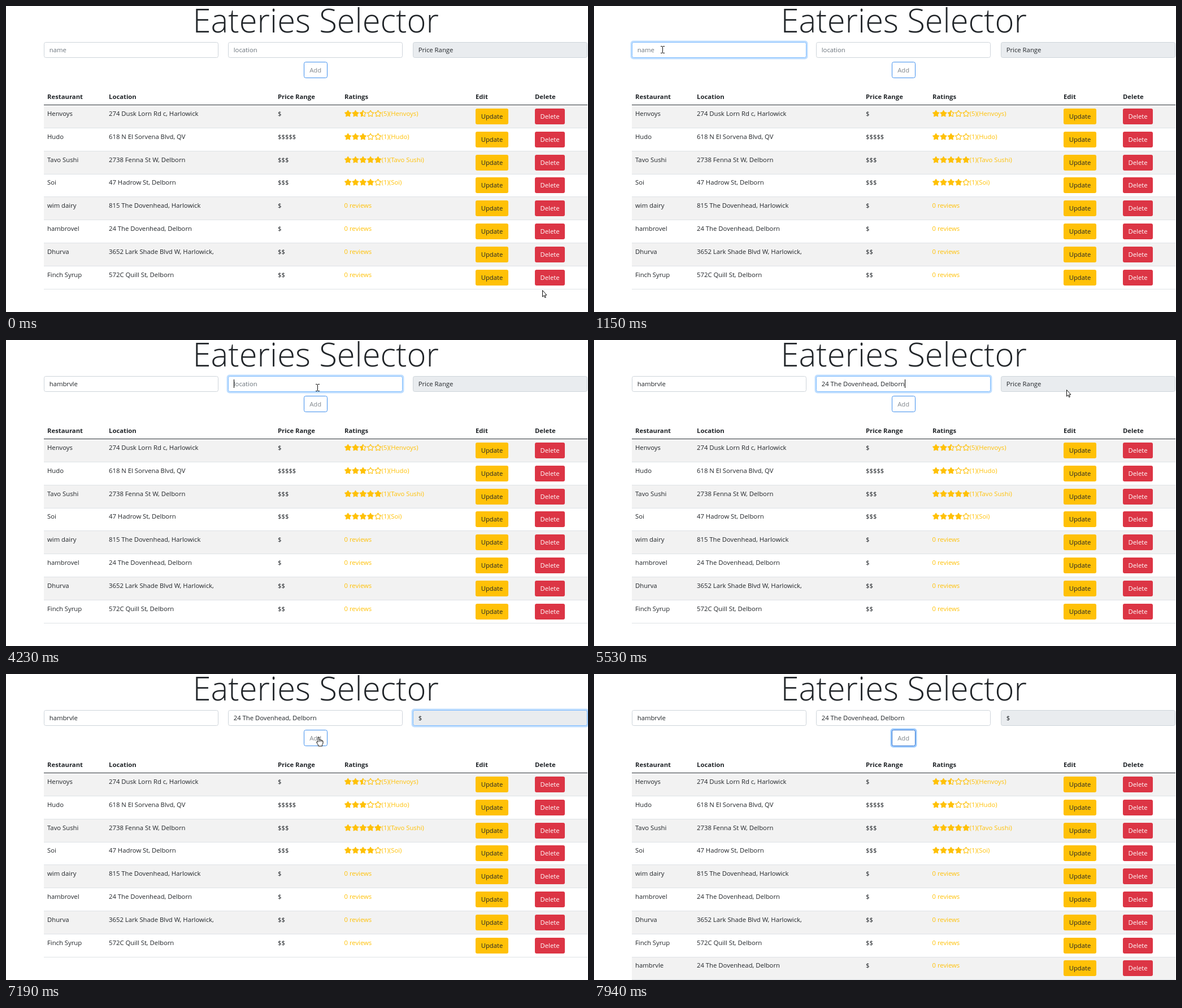
An HTML page with a canvas for the animation above (8000 ms loop, 1030 px wide and 543 px high).

```html
<!DOCTYPE html>
<html lang="en">
<head>
<meta charset="utf-8">
<title>Eateries Selector</title>
<style>
  html, body { margin: 0; width: 100%; height: 100%; overflow: hidden; background: #fff; }
  canvas { display: block; width: 1030px; height: 543px; }
</style>
</head>
<body>
<canvas id="stage"></canvas>
<script>
const W = 1030, H = 543, LOOP = 8000;
const canvas = document.getElementById('stage');
const ctx = canvas.getContext('2d');
const ratio = window.devicePixelRatio || 1;
canvas.width = W * ratio;
canvas.height = H * ratio;

const FAMILY = '"Open Sans", "Noto Sans", sans-serif';
const BODY = `400 11.3px ${FAMILY}`;
const BOLD = `700 11.3px ${FAMILY}`;
const TITLE = `300 58px ${FAMILY}`;
const INK = '#212529', GREY = '#6c757d', YELLOW = '#ffc107';

const TYPED_NAME = 'hambrvle';
const TYPED_PLACE = '24 The Dovenhead, Delborn';
const ROWS = [
  ['Henvoys', '274 Dusk Lorn Rd c, Harlowick', '$', 2.5, 5],
  ['Hudo', '618 N El Sorvena Blvd, QV', '$$$$$', 3, 1],
  ['Tavo Sushi', '2738 Fenna St W, Delborn', '$$$', 5, 1],
  ['Soi', '47 Hadrow St, Delborn', '$$$', 4, 1],
  ['wim dairy', '815 The Dovenhead, Harlowick', '$'],
  ['hambrovel', TYPED_PLACE, '$'],
  ['Dhurva', '3652 Lark Shade Blvd W, Harlowick,', '$$'],
  ['Finch Syrup', '572C Quill St, Delborn', '$$'],
  [TYPED_NAME, TYPED_PLACE, '$']
];
const COLUMNS = { Restaurant: 73, Location: 182, 'Price Range': 481, Ratings: 599, Edit: 831, Delete: 936 };
const TABLE_X = 67, TABLE_W = 962, ROW_TOP = 175.15, ROW_STEP = 40.8;

const NAME_BOX = [67, 64, 309, 28];
const PLACE_BOX = [393, 64, 309, 28];
const PRICE_BOX = [720, 64, 309, 28];
const ADD_BOX = [527, 99, 42, 29];

const NAME_FOCUS = 620, PLACE_FOCUS = 4100, PASTE = 5050;
const MENU_OPEN = 5740, MENU_PICK = 6560, ADD_FOCUS = 7260, ROW_ADDED = 7320;
const KEYS = [1680, 1810, 2010, 2120, 2220, 2330, 2430, 2540, 2740];
const BLINK = 530, TICK = 69, POINTER_GONE = 7935;

// Pointer path: time, x, y
const PATH = [
  [70, 949, 504], [340, 640, 300], [540, 190, 95], [620, 128, 72], [820, 121, 77],
  [3270, 121, 77], [3400, 99, 62], [3540, 180, 10], [3700, 330, 6], [3880, 500, 50], [4020, 551, 84],
  [4630, 551, 84], [4900, 640, 100], [5150, 740, 103], [5400, 836, 92], [5470, 836, 88],
  [5600, 836, 88], [MENU_OPEN, 834, 82], [5950, 810, 184], [6220, 783, 104], [6360, 781, 111],
  [MENU_PICK, 781, 111], [6900, 660, 130], [7190, 553, 112],
  [ROW_ADDED, 553, 112], [7600, 575, 280], [7870, 600, 521]
];

const inside = (p, [x, y, w, h]) => p.x >= x && p.x <= x + w && p.y >= y && p.y <= y + h;
const rowY = (i, offset = 0) => Math.round(ROW_TOP + offset + i * ROW_STEP);
const editBox = i => [831, rowY(i, 6.85), 58, 28];
const deleteBox = i => [936, rowY(i, 6.85), 53, 28];

function pointerAt(time) {
  const t = Math.ceil(time / TICK) * TICK;
  const next = PATH.findIndex(k => k[0] > t);
  if (next === 0) return { x: PATH[0][1], y: PATH[0][2] };
  if (next < 0) { const [, x, y] = PATH[PATH.length - 1]; return { x, y }; }
  const [t0, x0, y0] = PATH[next - 1], [t1, x1, y1] = PATH[next];
  const k = (t - t0) / (t1 - t0);
  return { x: Math.round(x0 + (x1 - x0) * k), y: Math.round(y0 + (y1 - y0) * k) };
}

function text(str, x, y, color = INK, font = BODY, align = 'left') {
  ctx.font = font;
  ctx.textAlign = align;
  ctx.fillStyle = color;
  ctx.fillText(str, x, y);
}

function textWidth(str) {
  ctx.font = BODY;
  return ctx.measureText(str).width;
}

function rect(x, y, w, h, color) {
  ctx.fillStyle = color;
  ctx.fillRect(x, y, w, h);
}

function rounded([x, y, w, h], radius, fill, stroke) {
  const inset = stroke ? 0.5 : 0;
  ctx.beginPath();
  ctx.roundRect(x + inset, y + inset, w - 2 * inset, h - 2 * inset, radius);
  ctx.fillStyle = fill;
  ctx.fill();
  if (!stroke) return;
  ctx.lineWidth = 1;
  ctx.strokeStyle = stroke;
  ctx.stroke();
}

function ring([x, y, w, h], color = '#bfdeff') {
  rounded([x - 2.4, y - 2.4, w + 4.8, h + 4.8], 5, color);
}

function field(box, value, { fill = '#fff', focused = false, color = INK } = {}) {
  if (focused) ring(box);
  rounded(box, 3, fill, focused ? '#80bdff' : '#ced4da');
  text(value, box[0] + 9.7, 82, color);
}

function caret(x, since, t) {
  if (Math.floor((t - since) / BLINK) % 2 === 0) rect(Math.round(x), 70, 1, 15, '#000');
}

function squiggle(x, width) {
  ctx.beginPath();
  for (let i = 0; i <= width; i += 1.5) ctx.lineTo(x + i, 84 + (i / 1.5 % 2 ? 0.8 : -0.8));
  ctx.lineWidth = 0.9;
  ctx.strokeStyle = '#e8322f';
  ctx.stroke();
}

function star(cx, cy, amount) {
  const shape = (outer, inner) => {
    ctx.beginPath();
    for (let i = 0; i < 10; i++) {
      const a = -Math.PI / 2 + i * Math.PI / 5, r = i % 2 ? inner : outer;
      ctx.lineTo(cx + r * Math.cos(a), cy + r * Math.sin(a));
    }
    ctx.closePath();
  };
  ctx.lineJoin = 'round';
  ctx.lineWidth = 1.1;
  ctx.strokeStyle = ctx.fillStyle = YELLOW;
  shape(5.9, 3.2);
  ctx.stroke();
  if (!amount) return;
  ctx.save();
  if (amount < 1) {
    ctx.beginPath();
    ctx.rect(cx - 8, cy - 8, 8, 16);
    ctx.clip();
    shape(5.9, 3.2);
  }
  ctx.fill();
  ctx.restore();
}

function tableRow(i, pointer) {
  const [name, place, price, rating, count] = ROWS[i];
  const top = rowY(i), bottom = rowY(i + 1), base = rowY(i, 19.85);
  if (i % 2 === 0) rect(TABLE_X, top + 1, TABLE_W, bottom - top - 1, '#f2f2f2');
  rect(TABLE_X, bottom, TABLE_W, 1, '#dee2e6');
  text(name, 73, base);
  text(place, 182, base);
  text(price, 481, base);
  if (rating === undefined) {
    text('0 reviews', 598.5, base, YELLOW);
  } else {
    for (let s = 0; s < 5; s++) star(605.2 + s * 13.3, base - 3.8, Math.max(0, Math.min(1, rating - s)));
    text(`(${count})(${name})`, 664.7, base, YELLOW);
  }
  const edit = editBox(i), del = deleteBox(i);
  rounded(edit, 3, inside(pointer, edit) ? '#e0a800' : YELLOW);
  text('Update', 860, edit[1] + 18, INK, BODY, 'center');
  rounded(del, 3, inside(pointer, del) ? '#c82333' : '#dc3545');
  text('Delete', 962.5, del[1] + 18, '#fff', BODY, 'center');
}

function menu(pointer) {
  const top = 93, step = 16.35;
  rect(720, 92, 309, 99, '#6f7478');
  rect(721, top, 307, 97, '#e6eaed');
  const hovered = Math.floor((pointer.y - top) / step);
  for (let i = 0; i < 6; i++) {
    const y = top + i * step, active = i > 0 && i === hovered;
    if (active) rect(721, Math.round(y), 307, 16, '#1e90ff');
    text(i ? '$'.repeat(i) : 'Price Range', 729.7, Math.round(y + 12.2), active ? '#fff' : i ? INK : '#7d8186');
  }
}

function outline(points) {
  ctx.beginPath();
  points.forEach(([x, y]) => ctx.lineTo(x, y));
  ctx.closePath();
  ctx.fill();
  ctx.stroke();
}

function drawPointer({ x, y }, kind) {
  ctx.save();
  ctx.translate(x, y);
  ctx.lineWidth = 1;
  ctx.lineJoin = 'round';
  ctx.strokeStyle = '#111';
  ctx.fillStyle = '#fff';
  if (kind === 'beam') {
    rect(0, -5, 1, 11, '#111');
    for (const dy of [-6, 6]) {
      rect(-3, dy, 3, 1, '#111');
      rect(1, dy, 3, 1, '#111');
    }
  } else if (kind === 'hand') {
    outline([[-1, 0], [1, 0], [1.5, 5], [4, 5], [6.5, 6], [8, 7], [8, 11], [6.5, 13.5],
      [6.5, 16], [0, 16], [-1, 13], [-3.5, 9.5], [-3, 8], [-1, 9]]);
    ctx.beginPath();
    for (const dx of [1.5, 3.8, 6]) { ctx.moveTo(dx, 5.5); ctx.lineTo(dx, 8.5); }
    ctx.lineWidth = 0.8;
    ctx.stroke();
  } else {
    outline([[0.5, 0.5], [0.5, 12], [3, 9.7], [4.8, 13.6], [6.4, 12.9], [4.7, 9], [8, 9]]);
  }
  ctx.restore();
}

function pointerKind(pointer, menuOpen, rowCount) {
  if (menuOpen) return 'arrow';
  if (inside(pointer, NAME_BOX) || inside(pointer, PLACE_BOX)) return 'beam';
  const buttons = [ADD_BOX];
  for (let i = 0; i < rowCount; i++) buttons.push(editBox(i), deleteBox(i));
  return buttons.some(b => inside(pointer, b)) ? 'hand' : 'arrow';
}

function drawForm(t) {
  const nameFocused = t >= NAME_FOCUS && t < PLACE_FOCUS;
  const placeFocused = t >= PLACE_FOCUS && t < MENU_OPEN;
  const priceFocused = t >= MENU_OPEN && t < ADD_FOCUS;
  const addFocused = t >= ADD_FOCUS;

  const pressed = KEYS.filter(k => k <= t);
  const name = (TYPED_NAME + ' ').slice(0, pressed.length);
  const place = t >= PASTE ? TYPED_PLACE : '';
  field(NAME_BOX, name || 'name', { focused: nameFocused, color: name ? INK : GREY });
  field(PLACE_BOX, place || 'location', { focused: placeFocused, color: place ? INK : GREY });
  field(PRICE_BOX, t >= MENU_PICK ? '$' : 'Price Range', { focused: priceFocused, fill: '#e9ecef' });

  if (nameFocused) {
    if (pressed.length === KEYS.length) squiggle(76.7, textWidth(TYPED_NAME));
    caret(76.2 + textWidth(name), pressed[pressed.length - 1] || NAME_FOCUS, t);
  }
  if (placeFocused) caret(402.7 + textWidth(place), place ? PASTE : PLACE_FOCUS, t);

  if (addFocused) ring(ADD_BOX, '#9ccaff');
  rounded(ADD_BOX, 3, '#fff', addFocused ? '#3476cf' : '#3f8fee');
  text('Add', 547.7, 118, '#848a90', BODY, 'center');
}

function draw(t) {
  const pointer = pointerAt(t);
  const menuOpen = t >= MENU_OPEN && t < MENU_PICK;
  const rowCount = t >= ROW_ADDED ? ROWS.length : ROWS.length - 1;
  ctx.setTransform(ratio, 0, 0, ratio, 0, 0);
  rect(0, 0, W, H, '#fff');
  text('Eateries Selector', 548.3, 47, INK, TITLE, 'center');
  drawForm(t);

  for (const [label, x] of Object.entries(COLUMNS)) text(label, x, 165, INK, BOLD);
  for (let i = 0; i < rowCount; i++) tableRow(i, menuOpen ? { x: -1, y: -1 } : pointer);
  rect(TABLE_X, 175, TABLE_W, 1, '#32383e');

  if (menuOpen) menu(pointer);
  if (t < POINTER_GONE) drawPointer(pointer, pointerKind(pointer, menuOpen, rowCount));
}

const start = performance.now();
function tick() {
  draw((performance.now() - start) % LOOP);
  requestAnimationFrame(tick);
}
tick();
</script>
</body>
</html>
```
